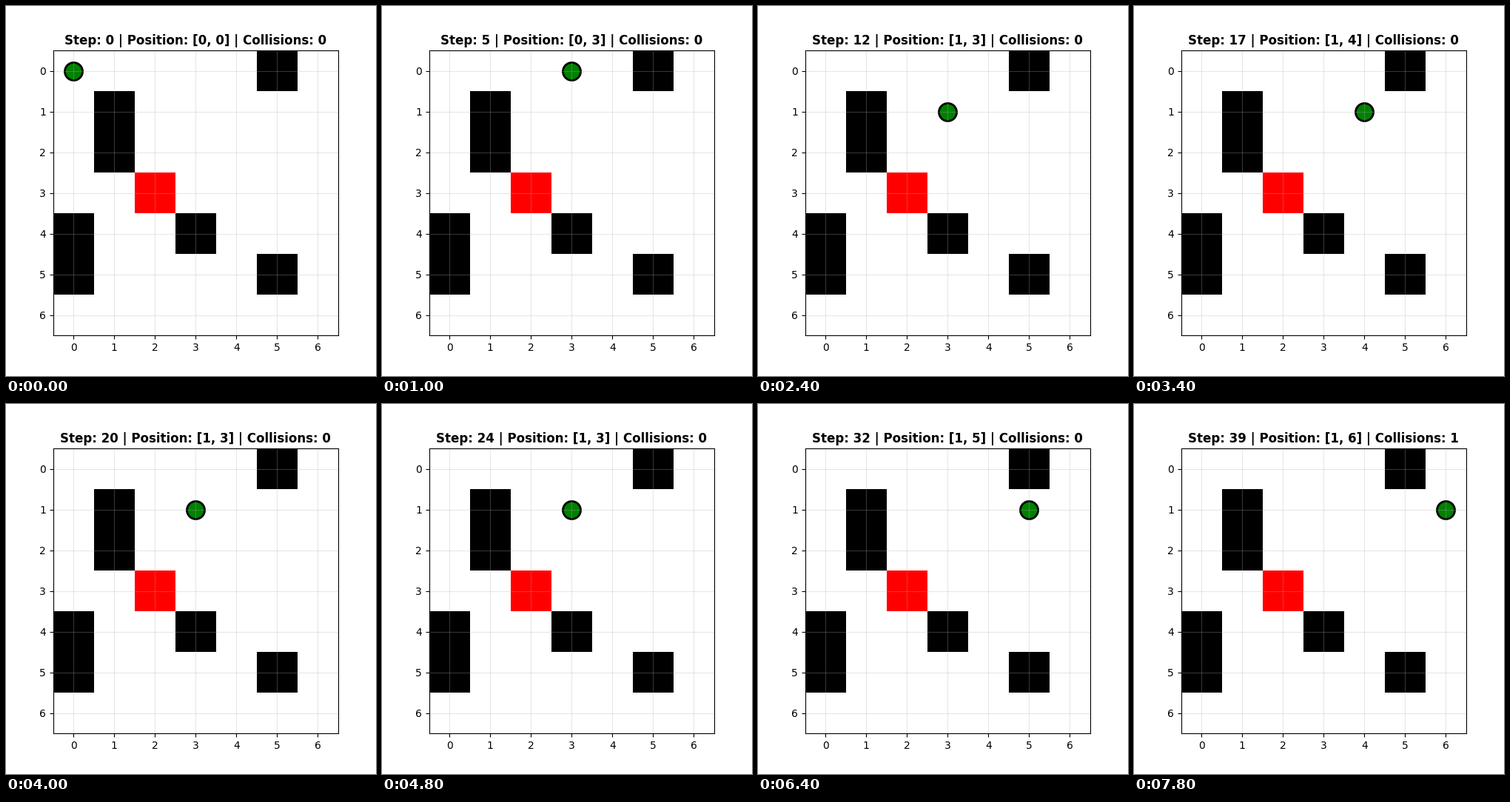
Write a matplotlib script that moves like this. It is 500 px wide and 500 px high and loops after 8000 ms.

```python
import matplotlib.pyplot as plt
import numpy as np
from matplotlib.animation import FuncAnimation

SIZE = 7
OBSTACLES = [(0, 5), (1, 1), (2, 1), (4, 0), (4, 3), (5, 0), (5, 5)]
GOAL = (3, 2)
MOVES = "RRRRLD" "RLDRUL" "RDLUR" "ULDDRUL" "DRULRDRU" "URDLDRU"
DELTAS = {"U": (-1, 0), "D": (1, 0), "L": (0, -1), "R": (0, 1)}


def walk(start, moves):
    """Return (row, col, collisions) for every step of the walk."""
    (row, col), hits = start, 0
    states = [(row, col, hits)]
    for move in moves:
        dr, dc = DELTAS[move]
        row, col = row + dr, col + dc
        hits += (row, col) in OBSTACLES
        states.append((row, col, hits))
    return states


def make_grid():
    grid = np.ones((SIZE, SIZE, 3))
    for cell in OBSTACLES:
        grid[cell] = (0, 0, 0)
    grid[GOAL] = (1, 0, 0)
    return grid


states = walk((0, 0), MOVES)

fig, ax = plt.subplots(figsize=(5, 5), dpi=100)
ax.imshow(make_grid())
ax.set_xticks(range(SIZE))
ax.set_yticks(range(SIZE))
ax.grid(True, alpha=0.3)
agent = ax.scatter([0], [0], s=300, c="green", edgecolors="black", linewidths=2)
title = ax.set_title("", fontweight="bold")


def update(step):
    row, col, hits = states[step]
    agent.set_offsets([[col, row]])
    title.set_text(f"Step: {step} | Position: [{row}, {col}] | Collisions: {hits}")
    return agent, title


anim = FuncAnimation(fig, update, frames=len(states), interval=200,
                     repeat=True, repeat_delay=0, blit=False)
plt.show()
```
